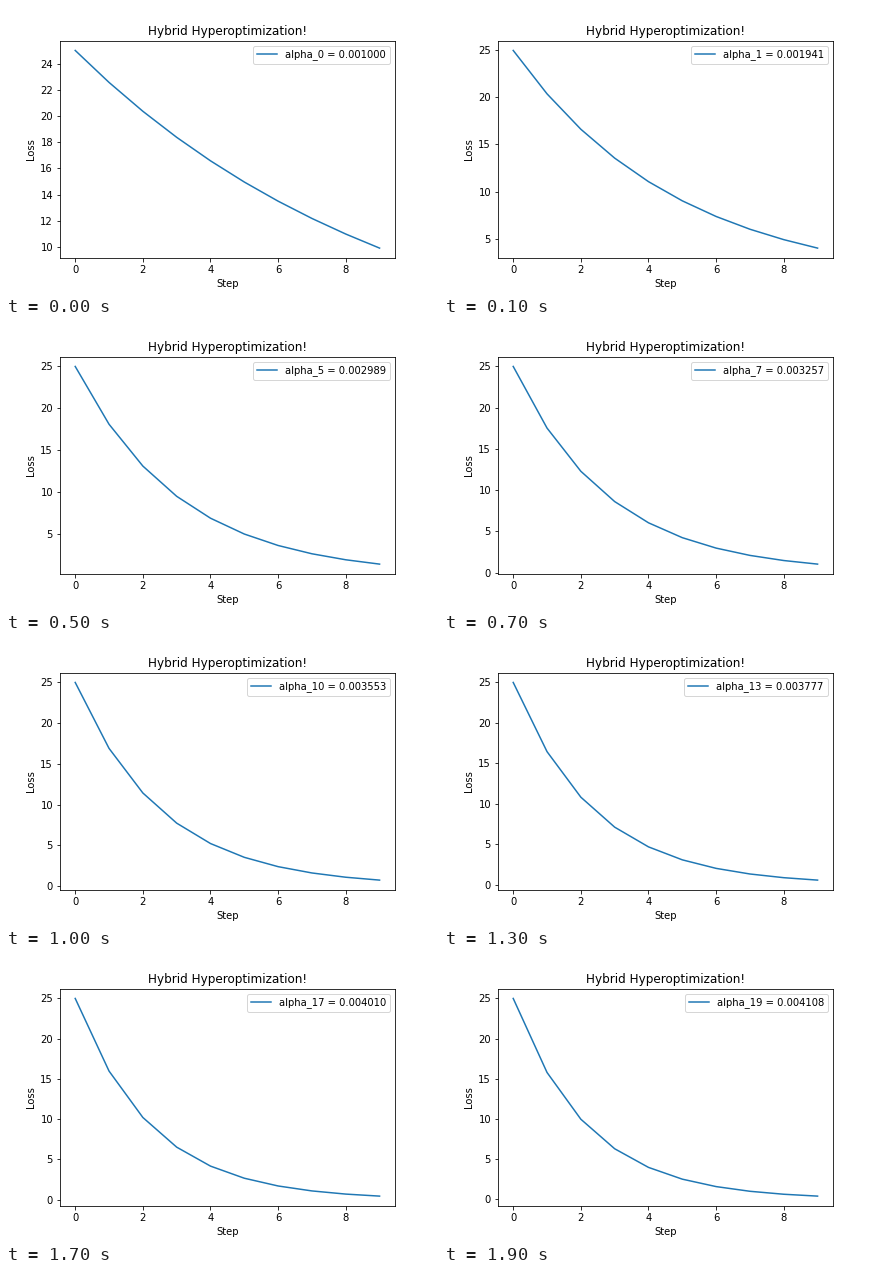
These frames come from a looping animation (432x288 px, 2000 ms). A matplotlib script:

```python
import matplotlib.pyplot as plt
import numpy as np
from matplotlib.animation import FuncAnimation

FRAMES = 20
STEPS = np.arange(10)
START_LOSS = 25.0
CURVATURE = 50.0
HYPER_RATE = 1e-7


def losses(alpha):
    """Loss of gradient descent on a parabola, step by step."""
    return START_LOSS * (1 - CURVATURE * alpha) ** (2 * STEPS)


def learning_rates(count, alpha=0.001):
    """Descend on the final loss with respect to the learning rate."""
    power = 2 * STEPS[-1]
    rates = []
    for _ in range(count):
        rates.append(alpha)
        shrink = 1 - CURVATURE * alpha
        grad = -START_LOSS * power * CURVATURE * shrink ** (power - 1)
        alpha -= HYPER_RATE * grad
    return rates


alphas = learning_rates(FRAMES)

fig = plt.figure(figsize=(6, 4), dpi=72, facecolor="white")
fig.subplots_adjust(left=0.125, right=0.9, bottom=0.125, top=0.88)
ax = fig.add_subplot()


def draw(i):
    ax.clear()
    ax.plot(STEPS, losses(alphas[i]), label=f"alpha_{i} = {alphas[i]:.6f}")
    ax.set_title("Hybrid Hyperoptimization!")
    ax.set_xlabel("Step")
    ax.set_ylabel("Loss")
    ax.legend(loc="upper right")
    return []


def reset():
    return draw(0)


anim = FuncAnimation(fig, draw, frames=FRAMES, init_func=reset,
                     interval=100, repeat=True, repeat_delay=0)
plt.show()
```
